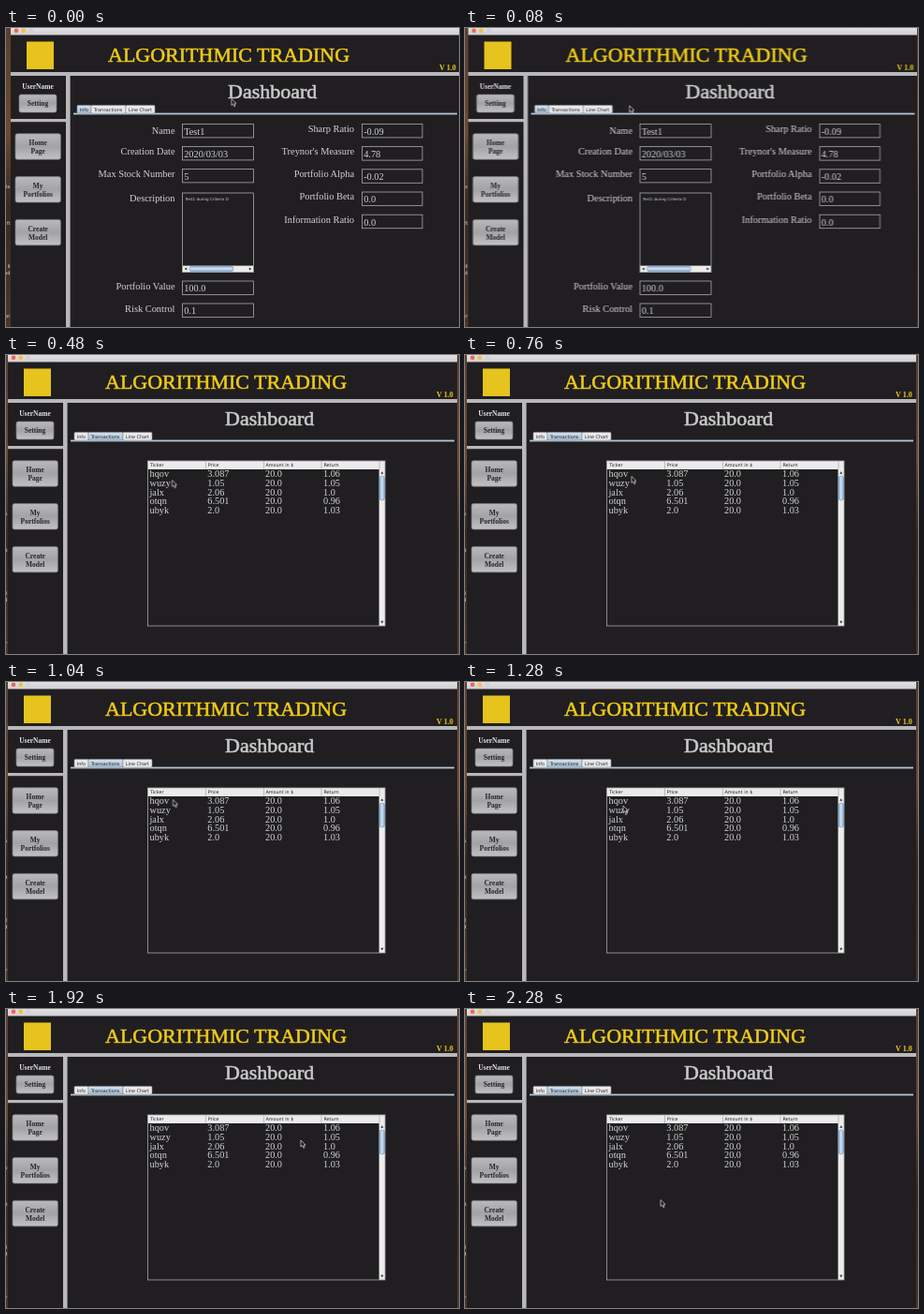
Recreate the animation shown at these times as an HTML page. Size 484 px wide and 319 px high, loop 2320 ms.

```html
<!DOCTYPE html>
<html lang="en">
<head>
<meta charset="utf-8">
<title>Trading dashboard</title>
<style>
  html, body { margin: 0; width: 100%; height: 100%; overflow: hidden; background: #3a2a20; }
  svg { display: block; width: 484px; height: 319px; }
  text { font-family: "Liberation Serif", "Times New Roman", serif; fill: #d2d2d2; white-space: pre; }
  .title { font-size: 22px; fill: #efcb16; stroke: #efcb16; stroke-width: .55; }
  .head { font-size: 22px; fill: #c9c9c9; stroke: #c9c9c9; stroke-width: .6; }
  .version { font-size: 8.1px; font-weight: 700; fill: #efcb16; }
  .side { font-size: 7.5px; font-weight: 700; text-anchor: middle; fill: #262428; }
  .user { fill: #e2e2e2; }
  .body { font-size: 10.3px; }
  .label { font-size: 10.4px; text-anchor: end; }
  .ui { font: 4.9px "DejaVu Sans", sans-serif; fill: #222; }
  .note { font: 4.1px "DejaVu Sans", sans-serif; }
  .desk { font: 5px "DejaVu Sans", sans-serif; text-anchor: end; fill: #ddd; }
  .field { fill: none; stroke: #a9a9a9; stroke-width: .8; }

  #pan, #info, #deals, #cursor { animation: 2320ms linear infinite; }
  #pan { animation-name: pan; }
  #info { animation-name: info; animation-timing-function: step-end; }
  #deals { animation-name: deals; animation-timing-function: step-end; }
  #cursor { animation-name: point; }

  @keyframes pan {
    0% { transform: translate(3px, 0); animation-timing-function: steps(4); }
    6.896%, 100% { transform: translate(0, 0); }
  }
  @keyframes info { 0% { visibility: visible; } 6.896%, 100% { visibility: hidden; } }
  @keyframes deals { 0% { visibility: hidden; } 6.896%, 100% { visibility: visible; } }
  @keyframes point {
    0% { transform: translate(241px, 75.5px); animation-timing-function: steps(4); }
    6.896%, 8.62% { transform: translate(110.5px, 90px); animation-timing-function: steps(7); }
    20.689% { transform: translate(177.5px, 133.5px); animation-timing-function: steps(14); }
    44.827% { transform: translate(178.5px, 125.5px); animation-timing-function: steps(11); }
    63.793% { transform: translate(161px, 137.5px); animation-timing-function: steps(11); }
    82.758% { transform: translate(315px, 140px); animation-timing-function: steps(9); }
    98.275%, 100% { transform: translate(209px, 203.5px); }
  }
</style>
</head>
<body>
<svg viewBox="0 0 484 319">
  <defs>
    <linearGradient id="wood" x2="0" y2="1">
      <stop offset="0" stop-color="#5a4030"/>
      <stop offset=".35" stop-color="#6b4a30"/>
      <stop offset=".6" stop-color="#3a2a20"/>
      <stop offset="1" stop-color="#4c3628"/>
    </linearGradient>
    <linearGradient id="bar" x2="0" y2="1">
      <stop offset="0" stop-color="#e2e1e2"/>
      <stop offset="1" stop-color="#cfced0"/>
    </linearGradient>
    <linearGradient id="button" x2="0" y2="1">
      <stop offset="0" stop-color="#b9b9bb"/>
      <stop offset=".5" stop-color="#a3a3a6"/>
      <stop offset="1" stop-color="#c2c2c4"/>
    </linearGradient>
    <linearGradient id="tabOn" x2="0" y2="1">
      <stop offset="0" stop-color="#d5e2ee"/>
      <stop offset="1" stop-color="#a4bdd3"/>
    </linearGradient>
    <linearGradient id="thumb">
      <stop offset="0" stop-color="#88a9cc"/>
      <stop offset=".5" stop-color="#d3e5f5"/>
      <stop offset="1" stop-color="#7d9fc4"/>
    </linearGradient>
    <linearGradient id="thumbFlat" href="#thumb" x2="0" y2="1"/>
  </defs>
  <rect width="484" height="319" fill="url(#wood)"/>
  <g id="pan">
    <g id="desk"></g>
    <rect x="2" width="480" height="319" fill="#201e21"/>
    <rect x="2" width="480" height="7.5" fill="url(#bar)"/>
    <circle cx="8" cy="2.8" r="2.4" fill="#f2625a"/>
    <circle cx="15.7" cy="2.8" r="2.4" fill="#f3bd4a"/>
    <circle cx="24" cy="2.8" r="2.4" fill="#d2d0d2"/>
    <rect x="19" y="14.5" width="29" height="29.5" fill="#e6c31d"/>
    <text class="title" x="106" y="36">ALGORITHMIC TRADING</text>
    <text class="version" x="460" y="45">V 1.0</text>
    <g fill="#b8b8ba">
      <rect x="2" y="47" width="480" height="4"/>
      <rect x="61" y="51" width="4.6" height="268"/>
      <rect x="2" y="97" width="59" height="3.2"/>
    </g>
    <text class="side user" x="31" y="65">UserName</text>
    <g id="side"></g>
    <text class="head" x="234" y="75">Dashboard</text>
    <rect x="69" y="90.6" width="410" height="1.8" fill="#b4c6d6"/>
    <g id="info"></g>
    <g id="deals"></g>
  </g>
  <path id="cursor" d="M0 0V7L1.6 5.6 2.8 8.2 4 7.7 2.9 5.1H5Z" fill="#111" stroke="#e6e6e6" stroke-width=".7"/>
</svg>
<script>
  const $ = id => document.getElementById(id);
  const text = (cls, x, y, s) => `<text class="${cls}" x="${x}" y="${y}">${s}</text>`;
  const rect = (x, y, w, h, attrs) => `<rect x="${x}" y="${y}" width="${w}" height="${h}" ${attrs}/>`;
  const arrow = (x, y, turn) =>
    `<path d="M-1.5 1.2L0 -1.4 1.5 1.2Z" fill="#333" transform="translate(${x} ${y}) rotate(${turn})"/>`;

  function button(x, y, w, h, lines, base) {
    return rect(x, y, w, h, 'rx="2" fill="url(#button)" stroke="#7c7c80" stroke-width=".7"') +
      lines.map((s, i) => text('side', x + w / 2, base + i * 9, s)).join('');
  }

  function tabs(active) {
    return [['Info', 73, 15], ['Transactions', 88, 37], ['Line Chart', 125, 31]].map(([s, x, w]) => {
      const fill = s === active ? 'url(#tabOn)' : '#e9e9e9';
      return rect(x, 82.4, w, 8.6, `rx="1" fill="${fill}" stroke="#88929c" stroke-width=".6"`) +
        text('ui', x + 2.8, 88.8, s);
    }).join('');
  }

  function field(label, value, right, x, w, y, base) {
    return text('label', right, base, label) +
      rect(x, y, w, 14.5, 'class="field"') + text('body', x + 1.8, y + 11.3, value);
  }

  function infoPage() {
    const left = [
      ['Name', 'Test1', 102.4, 113], ['Creation Date', '2020/03/03', 126.4, 135.3],
      ['Max Stock Number', '5', 150.4, 159.3], ['Portfolio Value', '100.0', 270, 278.5],
      ['Risk Control', '0.1', 294, 302.7]
    ];
    const right = [
      ['Sharp Ratio', '-0.09'], ["Treynor's Measure", '4.78'], ['Portfolio Alpha', '-0.02'],
      ['Portfolio Beta', '0.0'], ['Information Ratio', '0.0']
    ];
    return tabs('Info') + '<g transform="translate(3 0)">' .replace('3', '-3') +
      left.map(([s, v, y, base]) => field(s, v, 180.5, 188.4, 76, y, base)).join('') +
      right.map(([s, v], i) => field(s, v, 372, 380.4, 64.5, 102.4 + i * 24.2, 110.8 + i * 24.2)).join('') +
      text('label', 180.5, 184.5, 'Description') +
      rect(188.4, 176, 76, 84.6, 'class="field"') +
      text('note', 191.5, 183.6, 'Test1 during Criteria D') +
      rect(188.8, 253.6, 75.2, 6.6, 'fill="#ececec"') +
      rect(196, 254, 47, 5.8, 'rx="2.9" fill="url(#thumbFlat)" stroke="#6686a8" stroke-width=".5"') +
      arrow(192, 257, -90) + arrow(261, 257, 90) + '</g>';
  }

  function dealsPage() {
    const cols = [153.5, 215.3, 277, 339];
    const rows = [
      ['hqov', '3.087', '20.0', '1.06'], ['wuzy', '1.05', '20.0', '1.05'],
      ['jalx', '2.06', '20.0', '1.0'], ['otqn', '6.501', '20.0', '0.96'],
      ['ubyk', '2.0', '20.0', '1.03']
    ];
    return tabs('Transactions') +
      rect(151.4, 113, 253.6, 176, 'class="field"') +
      rect(151.8, 113.2, 253, 8.8, 'fill="#ebebeb"') +
      ['Ticker', 'Price', 'Amount in $', 'Return'].map((s, i) =>
        text('ui', cols[i] + .4, 119.4, s) +
        rect(cols[i] + 59.7, 113.4, .6, 8.4, 'fill="#9c9c9c"')).join('') +
      rows.map((row, r) => row.map((s, c) =>
        text('body', cols[c], (130.3 + r * 9.6).toFixed(1), s)).join('')).join('') +
      rect(398.6, 122, 6.2, 166.8, 'fill="#ededed"') +
      rect(399, 129, 5.6, 26, 'rx="2.8" fill="url(#thumb)" stroke="#6686a8" stroke-width=".5"') +
      arrow(401.8, 125.6, 0) + arrow(401.8, 285, 180);
  }

  $('desk').innerHTML = [['ts', 171], ['ft', 210], ['ll', 256], ['od', 263], ['or', 309]]
    .map(([s, y]) => text('desk', 1.4, y, s)).join('');
  $('side').innerHTML =
    button(11, 71, 40, 19, ['Setting'], 83.3) +
    button(7, 112.8, 48.4, 27.4, ['Home', 'Page'], 125) +
    button(7, 158.6, 48.4, 27.4, ['My', 'Portfolios'], 170.7) +
    button(7, 204.4, 48.4, 27.4, ['Create', 'Model'], 216.5);
  $('info').innerHTML = infoPage();
  $('deals').innerHTML = dealsPage();
</script>
</body>
</html>
```
